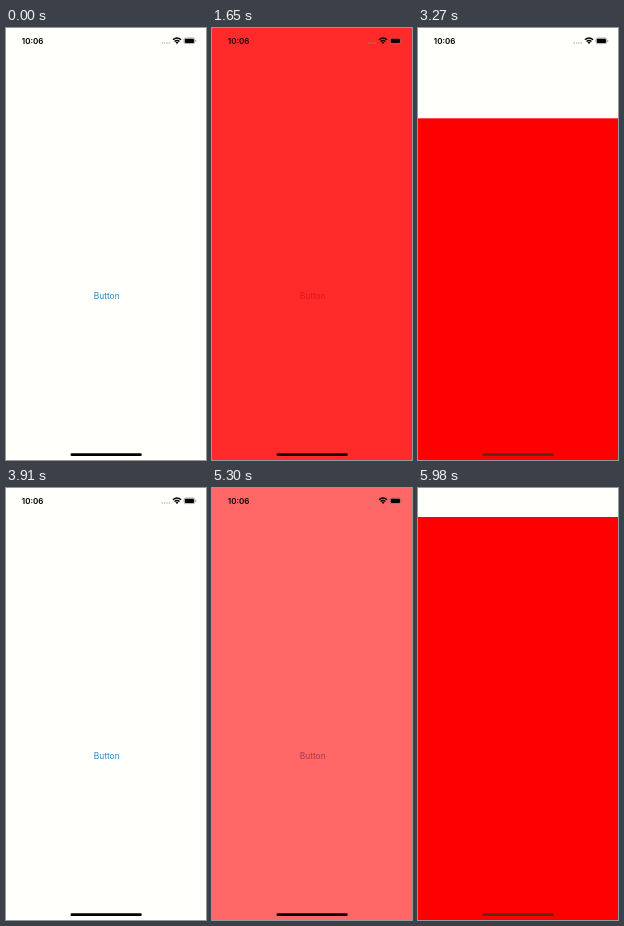
An HTML page that plays this animation: 200x432 px, repeating every 6130 ms.

```html
<!DOCTYPE html>
<html lang="en">
<head>
<meta charset="utf-8">
<title>Red sheet</title>
<style>
  html, body { margin: 0; height: 100%; overflow: hidden; background: #fffffb; }
  svg { display: block; width: 100%; height: 100%; }
  text { font-family: Inter, "Liberation Sans", sans-serif; }
</style>
</head>
<body>
<svg viewBox="0 0 200 432">
  <rect width="200" height="432" fill="#fffffb"/>
  <text id="button" x="100.7" y="271.2" font-size="8.4" text-anchor="middle">Button</text>
  <rect id="sheet" width="200" height="432" fill="#f00"/>
  <g id="status">
    <text x="15.8" y="15.6" font-size="8" font-weight="600">10:06</text>
    <path d="M155.8 15h8" stroke="#999970" stroke-width="1.2" stroke-dasharray="1.2 1.1"/>
    <g fill="none" stroke="#000" stroke-width="1.4">
      <path d="M166.9 11.8Q171 8.3 175.1 11.8"/>
      <path d="M168.5 13.5Q171 11.4 173.5 13.5"/>
    </g>
    <path d="M169.5 14.4Q171 13.3 172.5 14.4L171 15.9Z"/>
    <rect x="178" y="10" width="10.8" height="5.6" rx="1.6" fill="none" stroke="#777" stroke-width=".6"/>
    <rect x="178.8" y="10.7" width="9.2" height="4.2" rx=".9"/>
    <rect x="189.4" y="11.9" width=".8" height="1.9" rx=".4" fill="#777"/>
  </g>
  <rect id="home" x="64.5" y="425.3" width="71.3" height="2.7" rx="1.35"/>
</svg>
<script>
const LOOP = 6130;
const HEIGHT = 432;
const SECOND_SHOW = 3710; // delay between the two presentations
const [button, sheet, status, home] =
  ["button", "sheet", "status", "home"].map(id => document.getElementById(id));

const progress = (t, start, end) => Math.min(1, Math.max(0, (t - start) / (end - start)));
const smooth = u => u * u * (3 - 2 * u);
const within = (t, start, end) => t >= start && t < end;

// Top edge of the sheet: finger drag, then release.
function sheetTop(t) {
  if (t >= 5980) return 29;
  if (t < 2890 || t >= 3910) return 0;
  const drag = progress(t, 2890, 3500);
  const release = progress(t, 3500, 3900);
  return 20 + 42 * drag + 113 * drag * drag
    + (HEIGHT - 175) * (1 - (1 - release) ** 2);
}

function draw(t) {
  const shown = t < 3910 ? t : t - SECOND_SHOW;
  const opacity = t >= 3910 && t < 5040 ? 0 : smooth(progress(shown, 1406, 1736));
  const statusHidden = smooth(progress(shown, 1570, 2000));
  const statusBack = t < 3910 ? smooth(progress(t, 2890, 3200)) : 0;
  const tint = smooth(progress(shown, 1480, 1990))
    * (t < 3910 ? 1 - progress(t, 3500, 3900) : 1);
  const pressed = within(t, 1390, 1470) || within(t, 5040, 5120);

  button.setAttribute("fill", pressed ? "#4fa9c8" : "#2384c4");
  sheet.setAttribute("y", sheetTop(t));
  sheet.setAttribute("opacity", opacity);
  status.setAttribute("opacity", Math.max(1 - statusHidden, statusBack));
  home.setAttribute("fill", `rgb(${95 * tint}, ${42 * tint}, ${28 * tint})`);
}

const start = performance.now();
function tick() {
  draw((performance.now() - start) % LOOP);
  requestAnimationFrame(tick);
}
tick();
</script>
</body>
</html>
```
